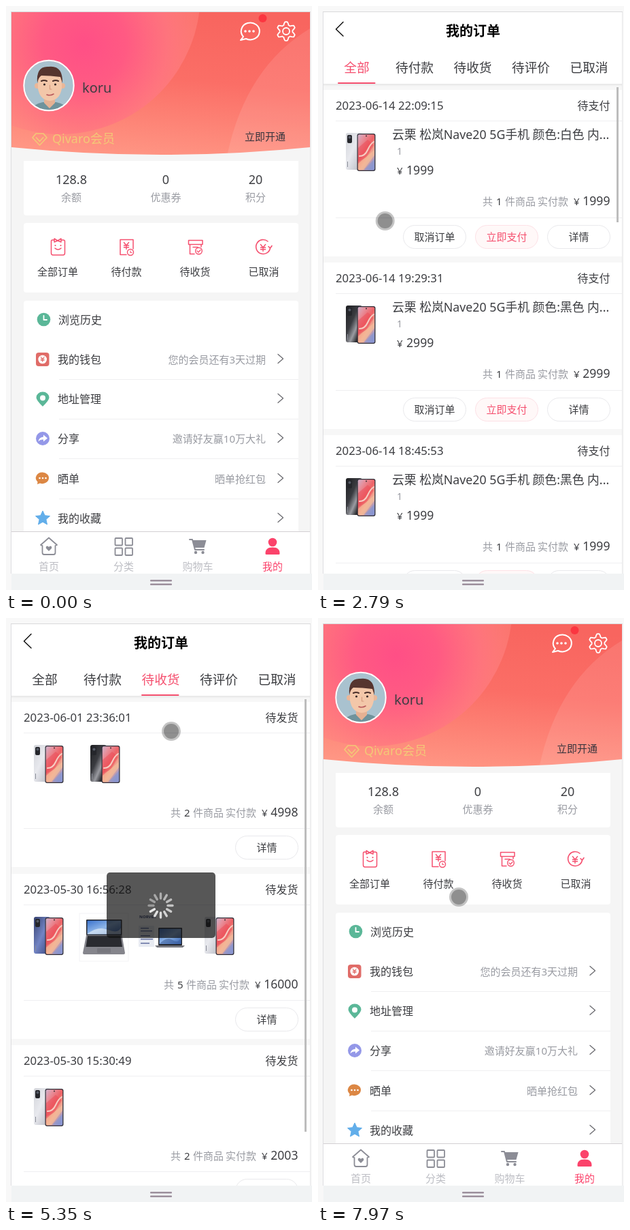
Recreate the animation shown at these times as an HTML page. Size 450 px wide and 856 px high, loop 8 s.

```html
<!DOCTYPE html>
<html lang="zh-CN">
<head>
<meta charset="utf-8">
<title>我的订单</title>
<style>
html, body { margin: 0; width: 100%; height: 100%; overflow: hidden; background: #f8f8f8; }
svg { display: block; width: 100%; height: 100%; }
text { font-family: "Noto Sans", "Noto Sans CJK SC", "Noto Sans CJK", sans-serif; white-space: pre; }
</style>
</head>
<body>
<svg id="stage" viewBox="0 0 450 856" xmlns="http://www.w3.org/2000/svg"></svg>
<script>
const RED = '#f5506f', DARK = '#3c3d41', GRAY = '#999ba2', PALE = '#bdbec4';
const $ = id => document.getElementById(id);

// ---- drawing helpers ----
const text = (x, y, size, str, fill = DARK, anchor = 'start', extra = '') =>
  `<text x="${x}" y="${y}" font-size="${size}" fill="${fill}" text-anchor="${anchor}" ${extra}>${str}</text>`;
const mid = (x, y, size, str, fill) => text(x, y, size, str, fill, 'middle');
const end = (x, y, size, str, fill) => text(x, y, size, str, fill, 'end');
const rect = (x, y, w, h, fill, r = 0, extra = '') =>
  `<rect x="${x}" y="${y}" width="${w}" height="${h}" rx="${r}" fill="${fill}" ${extra}/>`;
const circle = (x, y, r, fill, extra = '') => `<circle cx="${x}" cy="${y}" r="${r}" fill="${fill}" ${extra}/>`;
const shape = (d, fill, extra = '') => `<path d="${d}" fill="${fill}" ${extra}/>`;
const line = (d, color, w = 1.6) =>
  `<path d="${d}" fill="none" stroke="${color}" stroke-width="${w}" stroke-linecap="round" stroke-linejoin="round"/>`;
const ring = (x, y, r, color, w = 1.6) => circle(x, y, r, 'none', `stroke="${color}" stroke-width="${w}"`);
const group = (x, y, body, id = '') => `<g ${id && `id="${id}"`} transform="translate(${x} ${y})">${body}</g>`;
const rule = (x, y, w) => rect(x, y, w, 1, '#efeff1');
const yen = (x, y, k, color, w) =>
  line(`M${x - 4 * k} ${y - 5 * k}L${x} ${y}L${x + 4 * k} ${y - 5 * k}M${x} ${y}V${y + 6 * k}M${x - 4 * k} ${y}H${x + 4 * k}M${x - 4 * k} ${y + 3 * k}H${x + 4 * k}`, color, w);
const stops = list => list.map(([o, c, a = 1]) => `<stop offset="${o}" stop-color="${c}" stop-opacity="${a}"/>`).join('');

const defs = `<defs>
  <linearGradient id="banner" x1=".6" y1="0" x2=".4" y2="1">${stops([[0, '#f8655f'], [.45, '#fb6e66'], [1, '#ff9684']])}</linearGradient>
  <radialGradient id="glow" gradientUnits="userSpaceOnUse" cx="115" cy="55" r="175">${stops([[0, '#ff4f86'], [.35, '#ff5a83'], [.7, '#ff7580', .9], [1, '#ff8880', .45]])}</radialGradient>
  <linearGradient id="screen" x1="0" y1="0" x2=".7" y2="1">${stops([[0, '#cdb2cc'], [.22, '#e7909c'], [.5, '#ee6266'], [.72, '#f1a590'], [1, '#9696cc']])}</linearGradient>
  <linearGradient id="white" x2="1" y2="1">${stops([[0, '#d3d5da'], [.45, '#e8e9ee'], [1, '#b4b6bf']])}</linearGradient>
  <linearGradient id="black" x2="1" y2="1">${stops([[0, '#1d1e21'], [.4, '#3a3b40'], [.62, '#9a9ba1'], [.8, '#2c2d31'], [1, '#17181a']])}</linearGradient>
  <linearGradient id="blue" x2="1" y2="1">${stops([[0, '#36426f'], [.5, '#7284c4'], [1, '#38447a']])}</linearGradient>
  <linearGradient id="desk" x2="1" y2="1">${stops([[0, '#3a72cc'], [.5, '#8fb6e8'], [1, '#2f5cae']])}</linearGradient>
  <linearGradient id="shade" x2="0" y2="1">${stops([[0, '#000', .07], [1, '#000', 0]])}</linearGradient>
  <radialGradient id="press">${stops([[0, '#000', .58], [.65, '#000', .5], [1, '#000', .12]])}</radialGradient>
  <clipPath id="face"><circle cx="63" cy="116.500" r="36"/></clipPath>
  <clipPath id="top"><path d="M8 9H447V207Q228 229 8 207Z"/></clipPath>
</defs>`;

// ---- profile page ----
const avatar = `<g clip-path="url(#face)">
  ${rect(25, 79, 76, 76, '#a9c2cf')}
  ${shape('M36 156Q38 144 54 141H74Q90 144 92 156Z', '#6f939c')}
  ${shape('M56 132H72V142L64 150L56 142Z', '#e6b193')}
  ${circle(46, 117, 4, '#eab798')}${circle(83, 117, 4, '#eab798')}
  ${shape('M47 103Q64 94 82 103V121Q79 138 64.500 139Q50 138 47 121Z', '#f3c7a9')}
  ${shape('M46 113Q44 88 62 89Q84 86 83 113L80 104Q65 102 52 102Q48 104 46 113Z', '#56352f')}
  ${line('M52 110Q56 108 60 110M69 110Q73 108 77 110', '#4b302b', 2)}
  ${circle(56.5, 115, 1.6, '#3a2a28')}${circle(72.5, 115, 1.6, '#3a2a28')}
  ${line('M64.500 116V122H67', '#d79c80', 1.2)}${line('M60 130Q65 132 70 129', '#b8595b', 1.6)}
</g>${ring(63, 116.5, 36.7, '#fff', 2)}`;

const gear = Array.from({ length: 48 }, (_, i) => {
  const a = i * Math.PI / 24, r = 11.6 + 2.2 * Math.tanh(3 * Math.cos(6 * a));
  return `${i ? 'L' : 'M'}${(412 + r * Math.sin(a)).toFixed(1)} ${(37 - r * Math.cos(a)).toFixed(1)}`;
}).join('') + 'Z';

const banner = `<g clip-path="url(#top)">
  ${rect(8, 9, 439, 212, 'url(#banner)')}
  ${circle(80, -18, 206, 'url(#glow)')}
  ${shape('M447 33Q352 90 325 220L447 220Z', '#fff', 'opacity=".1"')}
</g>
${avatar}
${text(112, 127, 20, 'koru')}
${line('M44 187H55L60 193L49.500 204L39 193ZM44.500 193L49.500 198.500L54.500 193', '#f3c877', 1.7)}
${text(68, 201, 18, 'Qivaro会员', '#f3c877')}
${text(351, 197, 15, '立即开通', '#36343c')}
${line('M349 45A13.500 12.500 0 1 1 353 48L345 50Z', '#fff', 2)}
${[352, 358, 364].map(x => circle(x, 37, 1.8, '#fff')).join('')}
${circle(377.5, 18, 6, '#fb3640')}
${line(gear, '#fff', 1.8)}${ring(412, 37, 5, '#fff', 1.8)}`;

const stats = rect(26, 227, 404, 80, '#fff', 4) + rect(26, 227, 404, 8, '#fff') +
  [[96, '128.8', '余额'], [235, '0', '优惠券'], [367, '20', '积分']]
    .map(([x, n, s]) => mid(x, 261, 18, n) + mid(x, 286, 15, s, GRAY)).join('');

const orderIcons =
  line('M70 343H68Q66.500 343 66.500 345V362Q66.500 365 69 365H84Q86.500 365 86.500 362V345Q86.500 343 84 343H82M71 341L76 344L81 341V346L76 344L71 346ZM72 355Q76.500 359 81 355', RED, 1.5) +
  circle(72.5, 351, 1.1, RED) + circle(80.5, 351, 1.1, RED) +
  line('M177 364.500H168V342.500H187V356', RED, 1.5) + yen(177, 351, .9, RED, 1.4) + ring(183, 361, 4.5, RED, 1.4) + line('M183 359V361.500H185', RED, 1.1) +
  line('M268.500 343.500H289V349.500H268.500ZM270.500 349.500V363.500H277M287 349.500V353M275 353.500H282', RED, 1.5) + ring(283.5, 359, 4.8, RED, 1.4) + line('M281 359L283 361L286 357.500', RED, 1.2) +
  line('M385 345A10.500 10.500 0 1 0 388.500 355M386 352.500L388.500 355L391 351.500', RED, 1.6) + yen(378, 354, .9, RED, 1.4);

const orders = rect(26, 318, 404, 102, '#fff', 4) + orderIcons +
  [[76, '全部订单'], [177, '待付款'], [278, '待收货'], [379, '已取消']].map(([x, s]) => mid(x, 395, 15, s)).join('');

const star = Array.from({ length: 10 }, (_, i) => {
  const r = i % 2 ? 5.2 : 11, a = i * Math.PI / 5;
  return `${i ? 'L' : 'M'}${(54 + r * Math.sin(a)).toFixed(1)} ${(751 - r * Math.cos(a)).toFixed(1)}`;
}).join('') + 'Z';

const rowIcons =
  circle(55.5, 459.5, 9.8, '#5bb798') + line('M55.500 454V460H60', '#fff', 1.8) +
  rect(44, 508, 19.5, 20, '#e06c68', 4) + circle(53.7, 518, 6.3, '#fff') + yen(53.7, 517.5, .6, '#e06c68', 1.2) +
  shape('M54 587Q44.500 578 44.500 574A9.500 8.500 0 0 1 63.500 574Q63.500 578 54 587Z', '#5bb798') + circle(54, 574.5, 4, '#fff') +
  circle(54, 634, 10, '#9498e8') + shape('M55 628.500L61 633.500L55 638.500V635.500Q50 635 47.500 638.500Q48.500 632 55 631.500Z', '#fff') +
  shape('M54 683.500A9.500 8.300 0 1 1 50 699.500L46 701L46.500 697.500A9.500 8.300 0 0 1 54 683.500Z', '#dc8744') +
  [49.5, 54, 58.5].map(x => circle(x, 692, 1.3, '#fff')).join('') +
  shape(star, '#62aeea', 'stroke="#62aeea" stroke-linejoin="round"');

const rows = rect(26, 432, 404, 360, '#fff', 4) + rowIcons + text(77, 466, 16, '浏览历史') +
  [['我的钱包', '您的会员还有3天过期'], ['地址管理', ''], ['分享', '邀请好友赢10万大礼'], ['晒单', '晒单抢红包'], ['我的收藏', '']]
    .map(([name, note], i) => {
      const y = Math.round(518 + i * 58.2);
      return text(76, y + 6, 16, name) + end(382, y + 6, 15, note, GRAY) +
        line(`M400 ${y - 7.5}L407.500 ${y - 1}L400 ${y + 5.5}`, '#6b6b70', 1.3) + (i < 4 ? rule(78, y + 29, 352) : '');
    }).join('');

const tabbar = rect(8, 770, 439, 62, '#fff') + rect(8, 770, 439, 1, '#d3d0d3') +
  line('M53 791L51 790L63 779.500L75 790L72.500 791V801Q72.500 804 70 804H56Q53.500 804 53.500 801V791', '#8c8d96', 1.8) +
  shape('M63 799L59 795Q58 792 60.500 791.500Q62 791.500 63 793Q64 791.500 65.500 791.500Q68 792 67 795Z', '#8c8d96') +
  [[160.5, 780], [175.5, 780], [160.5, 794.5], [175.5, 794.5]].map(([x, y]) => rect(x, y, 10.5, 10.5, 'none', 1, 'stroke="#8c8d96" stroke-width="1.800"')).join('') +
  line('M270 782H274L278 797H291', '#8c8d96', 2) + shape('M274.500 783H294.500L291.500 794H277.500Z', '#8c8d96') +
  circle(279, 801, 2.2, '#8c8d96') + circle(289.5, 801, 2.2, '#8c8d96') +
  circle(392, 786, 6.3, '#fb436b') + shape('M381.500 803Q381 793.500 392 793.500Q403 793.500 402.500 803Q402.500 804 401 804H383Q381.500 804 381.500 803Z', '#fb436b') +
  [[63, '首页'], [173, '分类'], [282, '购物车']].map(([x, s]) => mid(x, 827, 15, s, PALE)).join('') + mid(392, 827, 15, '我的', '#fb436b');

const profile = rect(8, 9, 439, 823, '#f5f5f5') + banner + stats + orders + rows + tabbar;

// ---- orders page ----
const phone = (x, y, color) => group(x, y,
  rect(1, 0, 24, 54, `url(#${color})`, 3) + rect(3, 3, 7, 12, '#25262b', 2) + circle(6.5, 6.5, 2, '#555a66') + rect(3, 42, 1, 8, '#888b95') +
  rect(17.5, 1, 27, 55, '#303039', 3) + rect(18.7, 2.2, 24.5, 52.5, 'url(#screen)', 2) +
  shape('M19 22L33 10L42 18L31 36L19 42Z', '#ec4a56', 'opacity=".5"') +
  line('M21 34Q29 34 33 25T42 13', '#f6cfc4', 2) +
  shape('M19 45L43 25V33L27 54H19Z', '#f5bd98', 'opacity=".7"') + shape('M28 54L43 38V54Z', '#8496d2', 'opacity=".6"') + circle(31, 4.5, .9, '#222'));

const laptop = y => rect(108, y + 58, 72, 70, '#fff', 0, 'stroke="#f3f3f5"') +
  rect(118, y + 67, 52.5, 23, '#24262c', 1) + rect(119.5, y + 68.5, 49.5, 20, 'url(#desk)') +
  shape(`M119 ${y + 88.5}Q135 ${y + 76} 150 ${y + 82}T169 ${y + 79}V${y + 88.5}Z`, '#dfeaf6', 'opacity=".7"') +
  shape(`M118 ${y + 90}H170.500L175 ${y + 116}Q175 ${y + 118} 173 ${y + 118}H115Q113 ${y + 118} 113 ${y + 116}Z`, '#85858c') +
  shape(`M120 ${y + 91}H168.500L171 ${y + 107}H117.500Z`, '#2a2b30') + rect(134, y + 109, 20, 7, '#77777e', 1);

const poster = y => text(196, y + 65, 6, 'NORVEX', '#34406e', 'start', 'font-weight="700"') +
  rect(195, y + 76, 23, 31, '#e8ebf2', 1) +
  [[79, 12], [83, 17], [90, 14], [95, 18], [101, 13]].map(([d, w]) => rect(198, y + d, w, 1.4, '#5a689b')).join('') +
  rect(224, y + 79, 35, 26, '#24262c', 1) + rect(225.5, y + 80.5, 32, 22.5, 'url(#desk)') +
  shape(`M225.500 ${y + 103}Q236 ${y + 91} 245 ${y + 97}T257.500 ${y + 92}V${y + 103}Z`, '#3f5f9c', 'opacity=".6"') +
  shape(`M219 ${y + 105}H263L260 ${y + 108}H222Z`, '#77787f');

const pill = (x, y, label, hot) =>
  rect(x - 45.5, y + .5, 92, 34, hot ? '#fff8f8' : '#fff', 17, `stroke="${hot ? '#fde1e6' : '#e9e9ec'}"`) + mid(x + .5, y + 23, 15, label, hot ? RED : DARK);

const total = (y, count, price) => {
  const x = (price.length - 4) * -10;
  return [[242, '共', GRAY], [262, count, DARK], [275, '件商品', GRAY], [323, '实付款', GRAY], [376, '¥', DARK]]
    .map(([dx, s, c]) => text(dx + x, y, 15, s, c)).join('') + end(429.5, y, 17.6, price);
};

const head = (y, h, date, status) => rect(8, y, 439, h, '#fff') + text(26, y + 29, 16.8, date) + end(429.5, y + 29, 16, status) + rule(26, y + 45, 421);

const unpaid = [['2023-06-14 22:09:15', 'white', '白', '1999'], ['2023-06-14 19:29:31', 'black', '黑', '2999'], ['2023-06-14 18:45:53', 'black', '黑', '1999']]
  .map(([date, color, word, price], i) => {
    const y = 123 + i * 253;
    return head(y, 244, date, '待支付') + phone(40, y + 63, color) +
      text(109, y + 72, 17.8, `云栗 松岚Nave20 5G手机 颜色:${word}色 内...`) + text(116, y + 95, 14, '1', GRAY) +
      text(116, y + 124, 15, '¥') + text(130, y + 124, 17.6, price) + total(y + 169, '1', price) + rule(26, y + 187, 421) +
      pill(171, y + 198, '取消订单') + pill(277, y + 198, '立即支付', true) + pill(383, y + 198, '详情');
  }).join('') + rect(439, 119, 3, 198, '#bdbdbd');

const unsent = [['2023-06-01 23:36:01', '2', '4998'], ['2023-05-30 16:56:28', '5', '16000'], ['2023-05-30 15:30:49', '2', '2003']]
  .map(([date, count, price], i) => {
    const y = [123, 375, 626][i];
    const goods = [
      () => phone(40, y + 63, 'white') + phone(123, y + 63, 'black'),
      () => phone(40, y + 63, 'blue') + laptop(y) + poster(y) + phone(291, y + 63, 'white'),
      () => phone(40, y + 63, 'white')
    ][i]();
    return head(y, 242, date, '待发货') + goods + total(y + 168, count, price) + rule(26, y + 185, 421) + pill(383, y + 196, '详情');
  }).join('') + rect(439, 119, 3, 634, '#bdbdbd');

const spokes = (r0, r1, w, paint) => Array.from({ length: 12 }, (_, i) =>
  `<line y1="${-r0}" y2="${-r1}" stroke="${paint(i)}" stroke-width="${w}" stroke-linecap="round" transform="rotate(${i * 30})"/>`).join('');

const loading = group(183, 137, `<g id="spinSmall">${spokes(8, 14, 2.4, i => `rgba(70,70,70,${i ? (.1 + .055 * i).toFixed(2) : .75})`)}</g>`) +
  text(210, 144, 16, '正在加载...', '#777');

const modal = rect(148, 373, 160, 96, 'rgba(17,17,17,.7)', 5) +
  group(227.5, 421.5, `<g id="spinBig">${spokes(10.5, 17.5, 3.4, i => {
    const v = i ? Math.round(145 + i * 7.3) : 233;
    return `rgb(${v},${v},${v})`;
  })}</g>`);

const tabs = [[57, '全部', 29], [142, '待付款', 114], [227.5, '待收货', 199], [313, '待评价'], [398.5, '已取消']];
const ordersPage = rect(8, 9, 439, 823, '#f7f7f7') +
  `<g id="loading">${loading}</g><g id="unpaid">${unpaid}</g><g id="unsent">${unsent}</g>` +
  rect(8, 9, 439, 105, '#fff') + rect(8, 114, 439, 4, 'url(#shade)') +
  line('M37 23.500L26.500 34L37 44', '#111', 1.5) + text(228, 44, 20, '我的订单', '#000', 'middle', 'font-weight="700"') +
  tabs.map(([x, s], i) => text(x, 97, 18.7, s, DARK, 'middle', `id="tab${i}"`)).join('') +
  rect(0, 112, 55.5, 2, RED, 1, 'id="underline"') + `<g id="modal">${modal}</g>`;

const frame = shape('M0 0H450V856H0ZM8 9V832H447V9Z', '#f8f8f8', 'fill-rule="evenodd"') +
  rect(7, 8, 441, 1, '#d9d9db') + rect(7, 9, 1, 823, '#dddde0') + rect(447, 9, 1, 823, '#e6e6e8') +
  rect(8, 832, 442, 24, '#f1f3f4') + rect(212, 841, 32, 2.4, '#9c8f9c', 1) + rect(212, 846.5, 32, 2.4, '#9c8f9c', 1);

const cursor = `<g id="cursor">
  <g id="idle">${circle(0, 0, 14, 'rgba(0,0,0,.23)')}${circle(0, 0, 11, 'rgba(0,0,0,.27)')}</g>
  <g id="down">${circle(0, 0, 14, 'url(#press)')}</g>
  <g id="click">${circle(0, 0, 15, 'rgba(214,214,70,.75)')}${circle(0, 0, 13, 'rgba(182,178,50,.5)')}</g>
</g>`;

$('stage').innerHTML = defs + `<g id="profile">${profile}</g><g id="orders">${ordersPage}</g>` + frame + cursor;

// ---- timeline ----
const LOOP = 8000;
const views = [[0, 'profile'], [1490, 'loading', 0], [2310, 'unpaid', 0], [3760, 'loading', 1], [4220, 'unpaid', 1], [4780, 'loading', 2], [5280, 'unsent', 2], [7060, 'profile']];
const path = [[470, 388, 758], [1210, 92, 390], [1280, 85, 381], [2720, 85, 381], [2990, 137, 130], [3060, 133, 109], [3150, 133, 109],
  [3350, 124, 93], [3550, 124, 93], [3620, 132, 93], [3900, 132, 93], [4150, 190, 112], [4360, 212, 107], [4500, 226, 94], [4920, 226, 94],
  [5140, 240, 150], [5350, 243, 166], [5420, 244, 170], [5830, 244, 170], [6650, 44, 40], [6790, 41, 35], [6990, 40, 34], [7180, 40, 34], [7970, 207, 409]];
const fades = [[1490, 0], [1640, 1], [2310, 1], [2520, 0], [3760, 0], [3900, 1], [4270, 1], [4480, 0], [4780, 0], [4920, 1], [5380, 1], [5590, 0]];
const presses = [[1350, 1420], [3600, 3690], [4640, 4710]];
const clicks = [[1420, 1490], [3690, 3760], [4710, 4780], [6990, 7060]];

const within = (list, t) => list.some(([a, b]) => t >= a && t < b);
const show = (id, on) => $(id).style.display = on ? '' : 'none';

function sample(keys, t) {
  const i = keys.findIndex(k => k[0] > t);
  if (i < 0) return keys[keys.length - 1].slice(1);
  if (!i) return keys[0].slice(1);
  const a = keys[i - 1], b = keys[i], p = (t - a[0]) / (b[0] - a[0]);
  return a.slice(1).map((v, n) => v + (b[n + 1] - v) * p);
}

function draw(t) {
  const [, view, tab = 0] = views.filter(v => v[0] <= t).pop();
  show('profile', view === 'profile');
  show('orders', view !== 'profile');
  for (const id of ['loading', 'unpaid', 'unsent']) show(id, view === id);
  tabs.forEach((_, i) => $('tab' + i).setAttribute('fill', i === tab ? RED : DARK));
  $('underline').setAttribute('x', tabs[tab][2]);

  $('modal').style.opacity = sample(fades, t)[0];
  const turn = Math.floor(t * 12 / 1000) * 30;
  $('spinBig').setAttribute('transform', `rotate(${turn + 120})`);
  $('spinSmall').setAttribute('transform', `rotate(${turn + 90})`);

  const [x, y] = sample(path, t);
  const click = within(clicks, t), down = within(presses, t);
  $('cursor').setAttribute('transform', `translate(${x} ${y})`);
  show('cursor', t >= path[0][0]);
  show('click', click);
  show('down', down);
  show('idle', !click && !down);
}

const start = performance.now();
function tick() {
  draw((performance.now() - start) % LOOP);
  requestAnimationFrame(tick);
}
tick();
</script>
</body>
</html>
```
